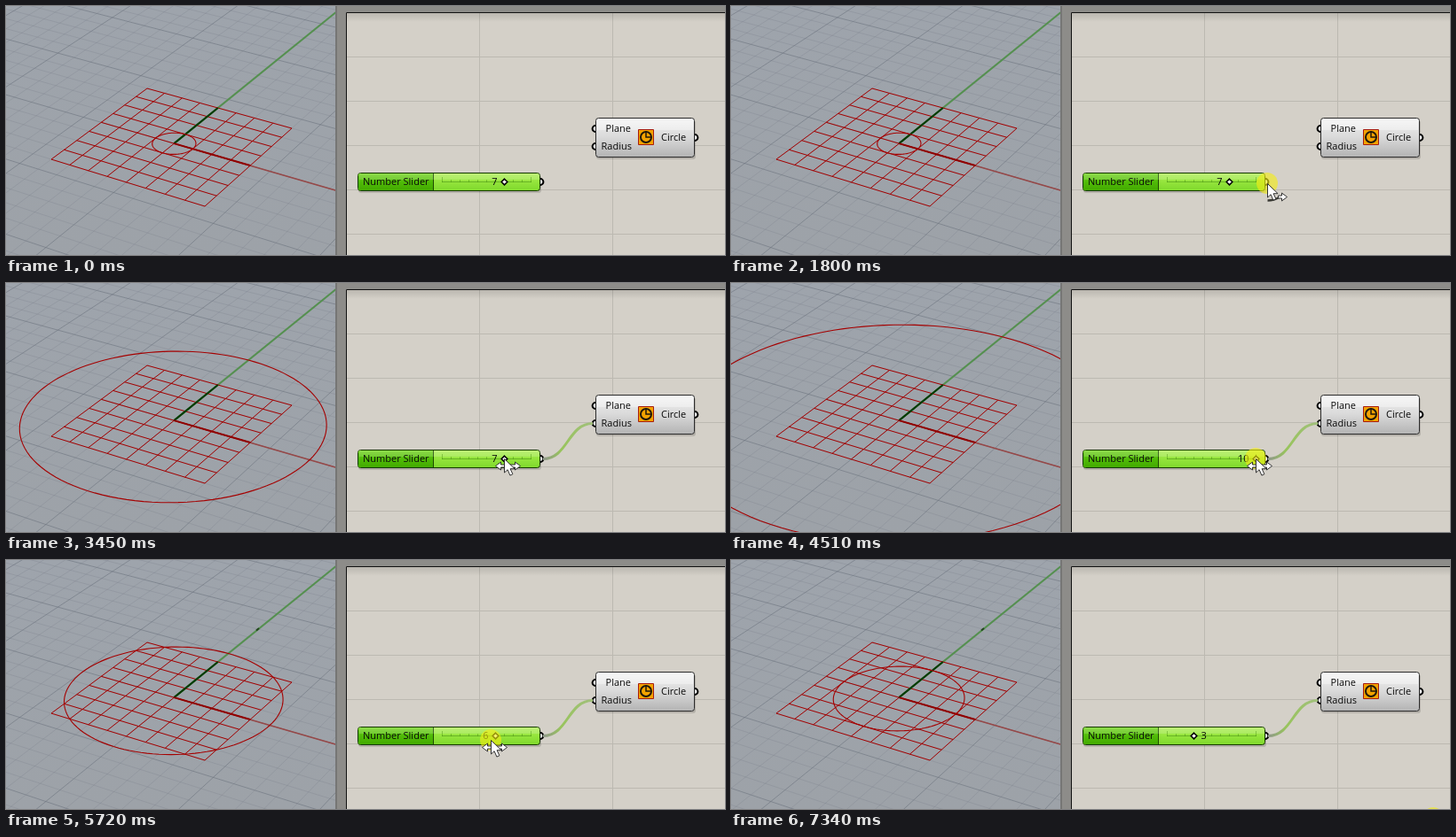
An HTML page with a canvas for the animation above (7.54 s loop, 810 by 281 pixels).

```html
<!DOCTYPE html>
<html lang="en">
<head>
<meta charset="utf-8">
<title>Slider driving a circle</title>
<style>
html, body { margin: 0; width: 100%; height: 100%; overflow: hidden; background: #d4d0c8; }
canvas { display: block; }
</style>
</head>
<body>
<canvas id="stage" width="810" height="281"></canvas>
<script>
const LOOP = 7540, W = 810, H = 281, VIEW = 371;
const stage = document.getElementById('stage').getContext('2d');
const FONT = '11px "Open Sans", "Noto Sans", sans-serif';

// start, end, step count, cursor waypoints, cursor kind, pressed
const MOVES = [
  [250, 1000, 12, [[647, 260], [612, 222], [594, 204], [604, 200]], 'arrow', false],
  [1800, 2490, 10, [[604, 200], [636, 188], [668, 168]], 'wire', true],
  [2700, 3450, 11, [[668, 168], [625, 205], [561, 198]], 'arrow', false],
  [3780, 4510, 10, [[561, 198], [591, 198]], 'slide', true],
  [4570, 4640, 2, [[591, 198], [591, 199]], 'slide', false],
  [4970, 5720, 12, [[591, 199], [546, 203]], 'slide', true],
  [5790, 6260, 8, [[546, 203], [521, 203]], 'slide', true],
  [6600, 6940, 6, [[521, 203], [620, 232], [744, 290]], 'arrow', false]
];

const smooth = p => p * p * (3 - 2 * p);

function along(points, p) {
  const s = p * (points.length - 1);
  const i = Math.min(points.length - 2, Math.floor(s));
  return [0, 1].map(k => points[i][k] + (points[i + 1][k] - points[i][k]) * (s - i));
}

function stateAt(t) {
  const move = MOVES.filter(m => t >= m[0]).pop();
  const s = { cursor: null, kind: 'arrow', pressed: false, knob: 7, radius: 1, wire: t >= 1870 };
  if (move) {
    const [from, to, n, points, kind, pressed] = move;
    const p = Math.min(1, Math.floor((t - from) / (to - from) * (n - 1) + 1e-6) / (n - 1));
    s.cursor = along(points, smooth(p));
    s.kind = kind;
    s.pressed = pressed;
    if (from === 250 && p === 1) s.kind = 'wire';
    if (from === 2700 && p > 0.8) s.kind = 'slide';
  }
  if (t >= 6940) s.cursor = null;
  if (t >= 2700) s.radius = 7;
  if (t >= 3780) {
    const x = t < 6600 ? s.cursor[0] : 521;
    const value = (x - 491) / 10;
    s.knob = Math.round(value);
    s.radius = Math.floor(value + 1e-6);
  }
  return s;
}

// Perspective of the ground plane, in model units
function project(x, y) {
  const w = 1.0216 - 0.00569 * x + 0.01109 * y;
  return [(193.45 + 20.35 * x + 15.26 * y) / w, (158.5 + 5.34 * x - 8.97 * y) / w];
}

function stroke(c, points, color, width = 1) {
  c.beginPath();
  points.forEach(p => c.lineTo(p[0], p[1]));
  c.strokeStyle = color;
  c.lineWidth = width;
  c.stroke();
}

function planeLine(c, a, b, color, width) {
  stroke(c, [project(...a), project(...b)], color, width);
}

function label(c, text, x, y, align = 'left') {
  c.font = FONT;
  c.textAlign = align;
  c.fillStyle = '#0a0a0a';
  c.fillText(text, x, y);
}

function box(c, x, y, w, h, r, fill, line) {
  c.beginPath();
  c.roundRect(x, y, w, h, r);
  c.fillStyle = fill;
  c.fill();
  if (line) {
    c.strokeStyle = line;
    c.lineWidth = 1;
    c.stroke();
  }
}

function shade(c, y0, y1, ...colors) {
  const g = c.createLinearGradient(0, y0, 0, y1);
  colors.forEach((color, i) => g.addColorStop(i / (colors.length - 1), color));
  return g;
}

function grip(c, x, y, side) {
  c.beginPath();
  c.arc(x, y, 3.4, -Math.PI / 2, Math.PI / 2, side < 0);
  c.fillStyle = '#fff';
  c.fill();
  c.strokeStyle = '#000';
  c.lineWidth = 2;
  c.stroke();
}

function drawGround(c) {
  c.fillStyle = shade(c, 0, H, '#9ea4ac', '#9da2a8');
  c.fillRect(0, 0, VIEW, H);
  const far = 40;
  for (let i = -far; i <= far; i++) {
    const color = i % 5 ? 'rgba(112,119,130,.24)' : 'rgba(105,112,122,.55)';
    planeLine(c, [i, -far], [i, far], color);
    planeLine(c, [-far, i], [far, i], color);
  }
  planeLine(c, [0, 0], [0, far], '#559050', 2);
  planeLine(c, [0, 0], [far, 0], '#964848', 1.6);
  for (let i = -4; i <= 4; i++) {
    planeLine(c, [i, -4], [i, 4], '#a50000');
    planeLine(c, [-4, i], [4, i], '#a50000');
  }
  planeLine(c, [0, 0], [0, 4], '#003a00', 2);
  planeLine(c, [0, 0], [4, 0], '#900000', 2);
}

function drawPanel(c) {
  c.fillStyle = '#8d8c89';
  c.fillRect(VIEW, 0, W - VIEW, H);
  c.fillStyle = '#767675';
  c.fillRect(VIEW, 0, 2, H);
  c.fillStyle = '#d4d0c8';
  c.fillRect(383, 7, W - 383, H - 7);
  c.fillStyle = '#bcb9b1';
  [533, 683].forEach(x => c.fillRect(x, 8, 1, H));
  [57, 107, 157, 207, 257].forEach(y => c.fillRect(384, y, W, 1));
  c.fillStyle = shade(c, 8, 18, 'rgba(0,0,0,.12)', 'rgba(0,0,0,0)');
  c.fillRect(384, 8, W, 10);
  stroke(c, [[383.5, H], [383.5, 7.5], [W, 7.5]], '#111');
}

function drawComponent(c) {
  grip(c, 664, 138.5, -1);
  grip(c, 664, 158.5, -1);
  grip(c, 776, 148.5, 1);
  box(c, 665, 129, 112, 44, 3, 'rgba(0,0,0,.15)');
  box(c, 664.5, 126.5, 111, 44, 3, shade(c, 126, 171, '#f2f2f2', '#d9d9d9', '#b2b2b2'), '#2c2c2c');
  c.fillStyle = 'rgba(255,255,255,.35)';
  c.fillRect(666, 128, 108, 12);
  label(c, 'Plane', 704, 142, 'right');
  label(c, 'Radius', 705, 162, 'right');
  label(c, 'Circle', 738, 152);
  box(c, 712.5, 139.5, 17, 17, 0, '#f4a300', '#a51b10');
  c.beginPath();
  c.arc(721, 148, 6, 0, 7);
  c.strokeStyle = '#20180a';
  c.lineWidth = 2;
  c.stroke();
  stroke(c, [[721, 141], [721, 148], [727, 148]], '#20180a', 1.5);
}

function drawSlider(c) {
  grip(c, 602, 198.5, 1);
  box(c, 397, 191, 206, 20, 3, 'rgba(0,0,0,.15)');
  box(c, 396.5, 188.5, 205, 20, 3, shade(c, 188, 209, '#b4f060', '#94e43c', '#7ed82c'), '#143800');
  box(c, 397, 189, 85, 19, [2, 0, 0, 2], shade(c, 189, 208, '#78d428', '#50bb08', '#43aa00'));
  stroke(c, [[481.5, 189], [481.5, 208]], '#1d4a00');
  c.fillStyle = 'rgba(255,255,255,.15)';
  c.fillRect(398, 189, 203, 7);
  stroke(c, [[491, 198.5], [592, 198.5]], 'rgba(50,120,5,.45)');
  for (let x = 491.5; x < 593; x += 10) {
    const top = x === 491.5 || x > 591 ? 193 : 196;
    stroke(c, [[x, top], [x, 199]], 'rgba(50,120,5,.35)');
  }
  label(c, 'Number Slider', 402, 202);
}

function drawKnob(c, value) {
  const x = 491.5 + value * 10, y = 198.5;
  if (value > 5) label(c, value, x - 8, 202, 'right');
  else label(c, value, x + 8, 202);
  c.beginPath();
  [[0, -3.3], [3.3, 0], [0, 3.3], [-3.3, 0]].forEach(p => c.lineTo(x + p[0], y + p[1]));
  c.closePath();
  c.fillStyle = '#fff';
  c.fill();
  c.strokeStyle = '#000';
  c.lineWidth = 1.6;
  c.stroke();
}

function drawCircle(c, r) {
  c.save();
  c.beginPath();
  c.rect(0, 0, VIEW, H);
  c.clip();
  const ring = Array.from({ length: 121 }, (_, i) => {
    const a = i / 60 * Math.PI;
    return project(r * Math.cos(a), r * Math.sin(a));
  });
  stroke(c, ring, '#a50000', 1.1);
  c.restore();
}

function drawWire(c, x, y) {
  const g = c.createLinearGradient(605, 0, 663, 0);
  g.addColorStop(0, '#8e968a');
  g.addColorStop(0.35, '#98c45c');
  g.addColorStop(1, '#a2bf7e');
  const reach = Math.max(4, (x - 605) / 2);
  c.beginPath();
  c.moveTo(605, 198.5);
  c.bezierCurveTo(605 + reach, 198.5, x - reach, y, x, y);
  c.strokeStyle = g;
  c.lineWidth = 3;
  c.stroke();
}

const ARROW = new Path2D('M0 0V15.5L3.6 12.2L6.4 18.6L9.4 17.2L6.6 11.2H11.6Z');
const WIRE_TIP = new Path2D('M16 10.5L22 15L16 19.5V16.5H12V13.5H16Z');
const SLIDE = new Path2D('M-10 8L-4 3.5V6.5H12V3.5L18 8L12 12.5V9.5H-4V12.5Z');

function drawShape(c, path) {
  c.fillStyle = '#fff';
  c.fill(path);
  c.strokeStyle = '#333';
  c.lineWidth = 1;
  c.stroke(path);
}

function glow(c, x, y) {
  c.beginPath();
  c.arc(x, y, 12, 0, 7);
  c.fillStyle = 'rgba(244,238,20,.62)';
  c.fill();
}

function drawCursor(c, [x, y], kind, pressed) {
  if (pressed) glow(c, x, y);
  c.save();
  c.translate(x + 0.5, y + 0.5);
  if (kind === 'wire') {
    c.beginPath();
    c.moveTo(0, 19);
    c.quadraticCurveTo(7, 19, 14, 15);
    c.strokeStyle = '#3a3a34';
    c.lineWidth = 2.5;
    c.stroke();
    drawShape(c, WIRE_TIP);
  }
  if (kind === 'slide') drawShape(c, SLIDE);
  drawShape(c, ARROW);
  c.restore();
}

const backdrop = document.createElement('canvas');
backdrop.width = W;
backdrop.height = H;
const back = backdrop.getContext('2d');
drawGround(back);
drawPanel(back);
drawSlider(back);
drawComponent(back);

function render(now) {
  const t = now % LOOP;
  const s = stateAt(t);
  stage.drawImage(backdrop, 0, 0);
  drawCircle(stage, s.radius);
  if (t >= 5000) stroke(stage, [[282, 79.5], [285, 77]], '#24461f', 2);
  if (s.wire) {
    const end = t < 2490 ? s.cursor : [661, 158.5];
    drawWire(stage, ...end);
  }
  drawKnob(stage, s.knob);
  if (s.cursor) drawCursor(stage, s.cursor, s.kind, s.pressed);
  if (t >= 7270) glow(stage, 791, 291);
}

function tick() {
  render(performance.now());
  requestAnimationFrame(tick);
}
tick();
</script>
</body>
</html>
```
